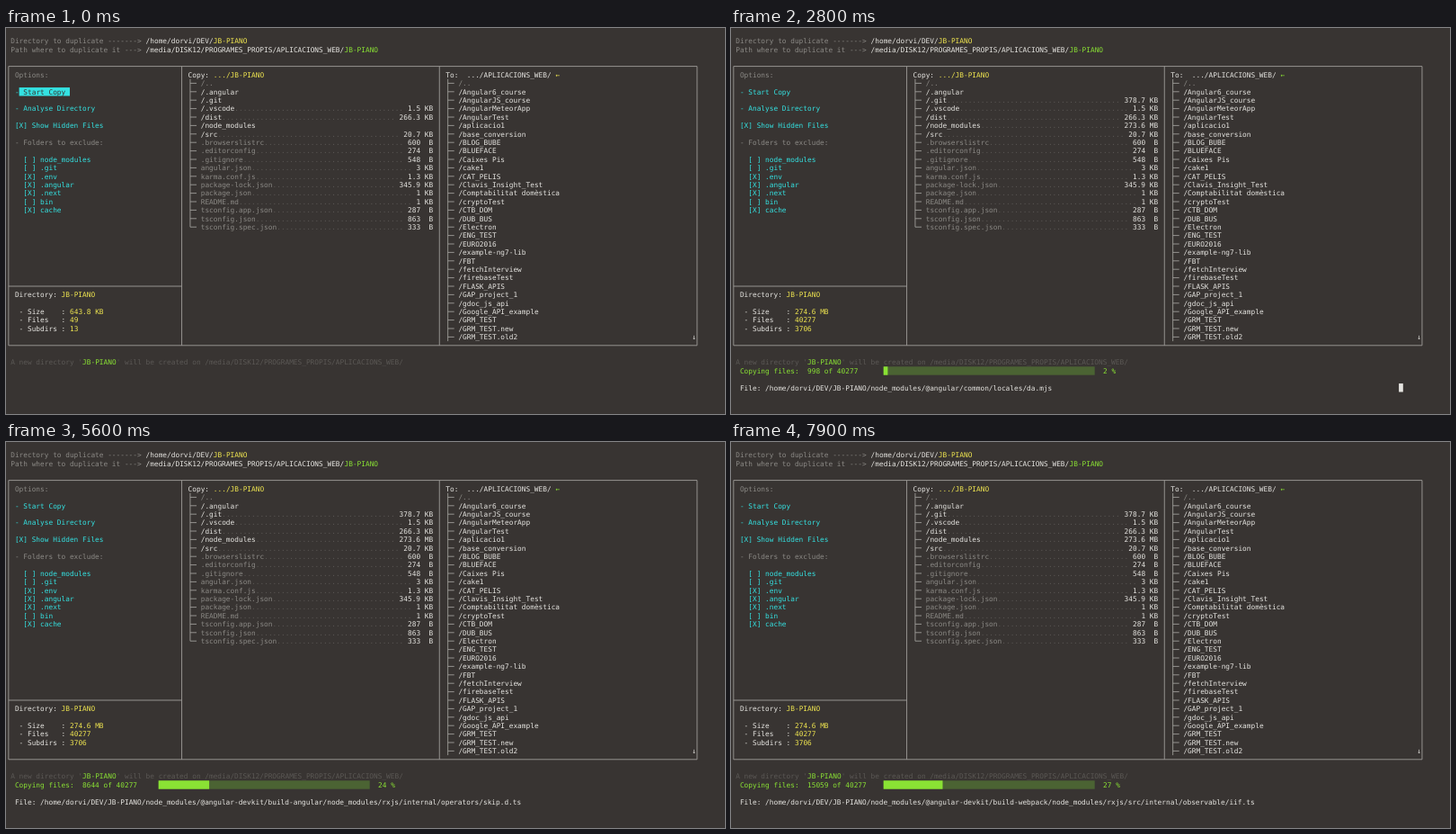
Recreate the animation shown at these times as an HTML page. Size 800 by 429 pixels, loop 8000 ms.

```html
<!DOCTYPE html>
<html lang="en">
<head>
<meta charset="utf-8">
<title>Directory copy</title>
<style>
  html, body { margin: 0; width: 100%; height: 100%; overflow: hidden; background: #383432; }
  svg { display: block; width: 100vw; height: 100vh; }
  text {
    font: 7.81px "DejaVu Sans Mono", monospace;
    white-space: pre;
    text-rendering: geometricPrecision;
  }
</style>
</head>
<body>
<svg viewBox="0 0 800 429">
  <g id="fixed"></g>
  <g id="live"></g>
</svg>
<script>
const LOOP = 8000, STEP = 100, CW = 4.7, RH = 9.4;
const CONFIRM_AT = 15, COPY_AT = 25;
const white = '#e6e5e1', gray = '#8b8985', dim = '#5b5855', line = '#a09e9a',
      cyan = '#34e2e2', yellow = '#f0e650', green = '#8ae234', red = '#bd4934', bg = '#383432';
const PROJECT = 'JB-PIANO';
const SOURCE = '/home/dorvi/DEV/';
const DEST = '/media/DISK12/PROGRAMES_PROPIS/APLICACIONS_WEB/';

const colX = c => 0.5 + c * CW;
const midX = c => colX(c + 0.5);
const midY = r => 14.4 + r * RH;
const text = (c, r, str, color) =>
  `<text x="${colX(c).toFixed(2)}" y="${(midY(r) + 2.8).toFixed(2)}" fill="${color}">${str}</text>`;
const block = (c, r, width, color) =>
  `<rect x="${colX(c)}" y="${midY(r) - RH / 2}" width="${width * CW}" height="${RH}" fill="${color}"/>`;
const path = d => `<path d="${d}" fill="none" stroke="${line}" stroke-width=".9"/>`;

// Text runs placed one after another on a row.
function runs(c, r, ...parts) {
  return parts.map(([str, color]) => {
    const out = text(c, r, str, color);
    c += str.length;
    return out;
  }).join('');
}

function tree(c, first, last, closed) {
  let d = `M${midX(c)} ${midY(first) - RH / 2}V${midY(last) + (closed ? 0 : RH / 2)}`;
  for (let r = first; r <= last; r++) d += `M${midX(c)} ${midY(r)}H${colX(c + 2)}`;
  return path(d);
}

function sizeCell(name, r, size) {
  const [value, unit] = size.split(' ');
  const start = 98 - value.length, from = 46 + name.length;
  return text(from, r, '.'.repeat(start - 1 - from), dim) +
    text(start, r, value, white) + text(101 - unit.length, r, unit, white);
}

const entries = [
  ['/..'], ['/.angular'], ['/.git', '', '378.7 KB'], ['/.vscode', '1.5 KB'], ['/dist', '266.3 KB'],
  ['/node_modules', '', '273.6 MB'], ['/src', '20.7 KB'], ['.browserslistrc', '600 B'],
  ['.editorconfig', '274 B'], ['.gitignore', '548 B'], ['angular.json', '3 KB'],
  ['karma.conf.js', '1.3 KB'], ['package-lock.json', '345.9 KB'], ['package.json', '1 KB'],
  ['README.md', '1 KB'], ['tsconfig.app.json', '287 B'], ['tsconfig.json', '863 B'],
  ['tsconfig.spec.json', '333 B']
];
const folders = ('..,Angular6_course,AngularJS_course,AngularMeteorApp,AngularTest,aplicacio1,' +
  'base_conversion,BLOG_BUBE,BLUEFACE,Caixes Pis,cake1,CAT_PELIS,Clavis_Insight_Test,' +
  'Comptabilitat domèstica,cryptoTest,CTB_DOM,DUB_BUS,Electron,ENG_TEST,EURO2016,' +
  'example-ng7-lib,FBT,fetchInterview,firebaseTest,FLASK_APIS,GAP_project_1,gdoc_js_api,' +
  'Google_API_example,GRM_TEST,GRM_TEST.new,GRM_TEST.old2').split(',');
const excludes = ['[ ] node_modules', '[ ] .git', '[X] .env', '[X] .angular', '[X] .next',
  '[ ] bin', '[X] cache'];

function drawFixed() {
  const [left, right, top, bottom] = [midX(0), midX(163), midY(3), midY(36)];
  return runs(1, 0, ['Directory to duplicate -------> ', gray], [SOURCE, white], [PROJECT, yellow]) +
    runs(1, 1, ['Path where to duplicate it ---> ', gray], [DEST, white], [PROJECT, green]) +
    path(`M${left} ${top}H${right}V${bottom}H${left}Z` +
      `M${midX(41)} ${top}V${bottom}M${midX(102)} ${top}V${bottom}M${left} ${midY(29)}H${midX(41)}`) +
    text(2, 4, 'Options:', gray) +
    text(2, 8, '- Analyse Directory', cyan) +
    text(2, 10, '[X] Show Hidden Files', cyan) +
    text(2, 12, '- Folders to exclude:', gray) +
    excludes.map((label, i) => text(4, 14 + i, label, cyan)).join('') +
    runs(2, 30, ['Directory: ', white], [PROJECT, yellow]) +
    runs(43, 4, ['Copy: ', white], ['.../' + PROJECT, yellow]) +
    tree(43, 5, 22, true) +
    entries.map(([name, size], i) =>
      text(46, 5 + i, name, i && name[0] === '/' ? white : gray) +
      (size ? sizeCell(name, 5 + i, size) : '')).join('') +
    text(104, 4, 'To:  .../APLICACIONS_WEB/', white) +
    tree(104, 5, 35, false) +
    folders.map((name, i) => text(107, 5 + i, '/' + name, i ? white : gray)).join('') +
    text(162.3, 35, '↓', white) +
    runs(1, 38, ["A new directory '", dim], [PROJECT, green], ["' will be created on " + DEST, dim]);
}

// [step, value] keys joined by straight lines.
const copied = [[25, 140], [36, 3286], [47, 6405], [64, 10635], [79, 15059]];
const percent = [[25, 0], [36, 8.9], [41, 21.5], [47, 23.2], [64, 25.2], [79, 27.1]];
function along(keys, s) {
  const i = Math.max(1, keys.findIndex(k => k[0] >= s));
  const [[s0, v0], [s1, v1]] = [keys[i - 1], keys[i]];
  return v0 + (v1 - v0) * (s - s0) / (s1 - s0);
}

// Folders in copy order: first step, folder, extension, file names.
const queue = [
  [25, '@angular/animations/fesm2015', '.mjs', 'animations browser'],
  [27, '@angular/common/locales', '.mjs', 'bg da en-GB es-CO fr hu kk lv nl tg'],
  [37, '@angular/compiler-cli/src/ngtsc', '.d.ts', 'annotations/index core/api imports/path'],
  [40, '@angular-devkit/architect/node_modules/rxjs/internal', '.js',
    'Subject observable/concat observable/zip operators/count operators/map scheduler/async ' +
    'testing/HotObservable testing/SubscriptionLoggable'],
  [48, '@angular-devkit/build-angular/node_modules/rxjs', '.d.ts',
    'add/operator/count add/operator/merge internal/Observer internal/Subject ' +
    'internal/observable/from internal/observable/race internal/operators/audit ' +
    'internal/operators/filter internal/operators/skip internal/util/noop ' +
    'observable/concat observable/merge observable/timer operator/concat operator/first ' +
    'operator/switch operator/timeout operators/count'],
  [66, '@angular-devkit/build-webpack/node_modules/rxjs', '.ts',
    'add/operator/last.d internal/operators/map.d internal/types.d observable/from.d ' +
    'operator/buffer.d operator/first.d operators/index.d src/Observable src/add/operator/scan ' +
    'src/internal/Subject src/internal/config src/internal/observable/concat ' +
    'src/internal/observable/from src/internal/observable/iif']
];
function currentFile(s) {
  const [start, folder, ext, names] = queue.filter(q => q[0] <= s).pop();
  const list = names.split(' ');
  return `${SOURCE}${PROJECT}/node_modules/${folder}/${list[(s - start) % list.length]}${ext}`;
}

function drawProgress(s) {
  const p = along(percent, s);
  return text(2, 39, `Copying files:  ${Math.floor(along(copied, s))} of 40277`, green) +
    block(36, 39, 50, '#4b6333') + block(36, 39, Math.round(p / 2), green) +
    text(88, 39, Math.round(p) + ' %', green) +
    text(2, 41, 'File: ' + currentFile(s), white) +
    (s % 6 === 4 ? block(158, 41, 1, white) : '');
}

function drawLive(s) {
  const analysed = s >= CONFIRM_AT;
  const stats = analysed ? ['274.6 MB', '40277', '3706'] : ['643.8 KB', '49', '13'];
  let out = text(130, 4, '←', s ? green : yellow) +
    ['Size', 'Files', 'Subdirs'].map((label, i) =>
      runs(3, 32 + i, [`- ${label.padEnd(8)}: `, white], [stats[i], yellow])).join('');
  if (!analysed) {
    return out + text(2, 6, '-', cyan) + block(3, 6, 12, cyan) + text(4, 6, 'Start Copy', bg);
  }
  out += text(2, 6, '- Start Copy', cyan) +
    entries.map(([name, , late], i) => late ? sizeCell(name, 5 + i, late) : '').join('');
  if (s >= COPY_AT) return out + drawProgress(s);
  return out + text(1, 39, 'Confirm:', red) + block(11, 39, 5, '#d3d7cf') +
    text(12, 39, 'OK', bg) + text(17, 39, 'Cancel', white);
}

const live = document.getElementById('live');
document.getElementById('fixed').innerHTML = drawFixed();
let shown = -1;
function render() {
  const s = Math.floor(performance.now() % LOOP / STEP);
  if (s !== shown) live.innerHTML = drawLive(shown = s);
  requestAnimationFrame(render);
}
render();
</script>
</body>
</html>
```
